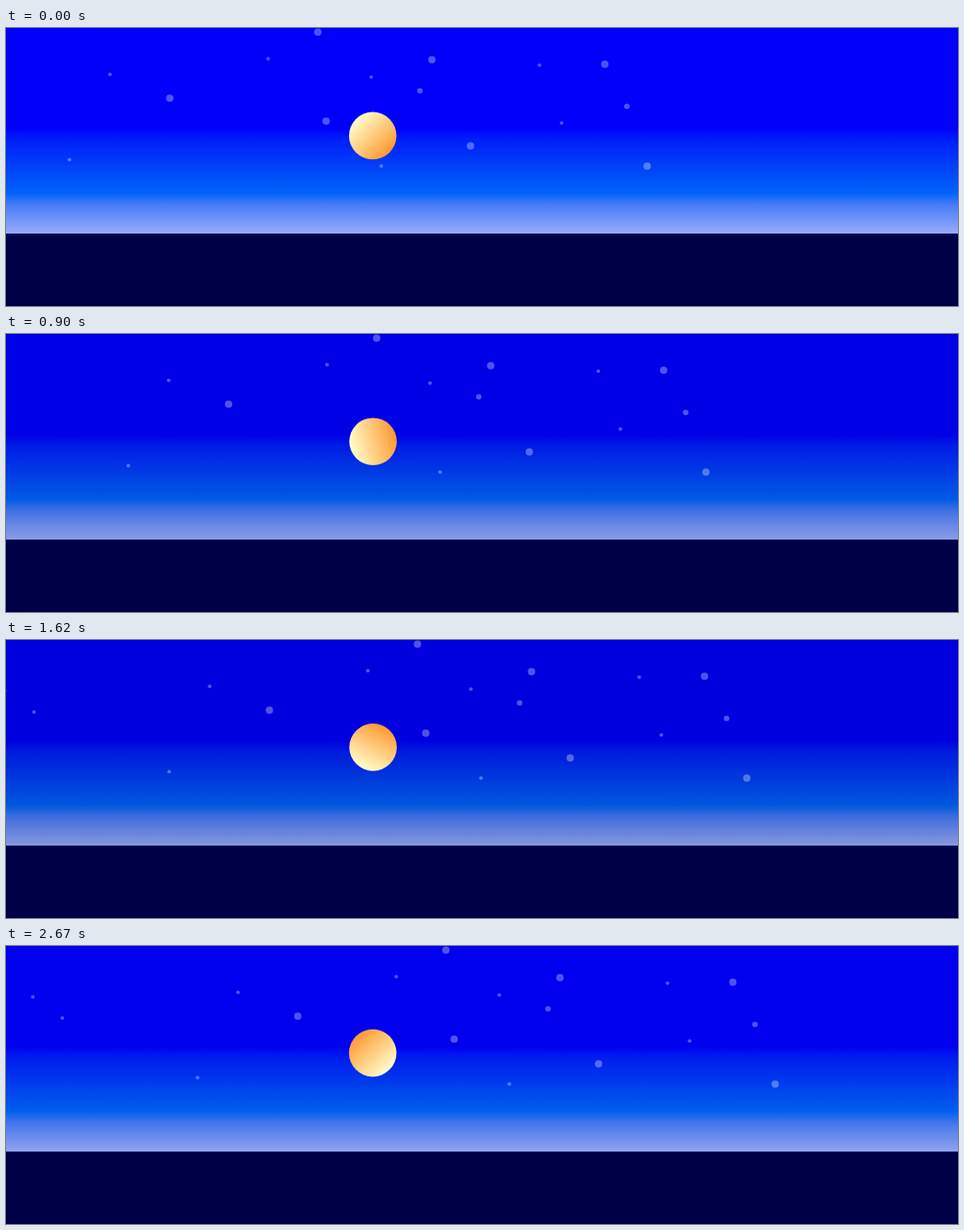
Animation, 1035 px wide and 303 px high, one loop 2.7 s. Source, as an HTML page with a canvas:

```html
<!DOCTYPE html>
<html>
<head>
<meta charset="utf-8">
<title>Night sky</title>
<style>
html, body { margin: 0; width: 100%; height: 100%; overflow: hidden; background: #000046; }
canvas { display: block; }
</style>
</head>
<body>
<canvas id="stage" width="1035" height="303"></canvas>
<script>
const ctx = document.getElementById('stage').getContext('2d');
const LOOP = 2700, STEP = 30, WIDTH = 1035, HORIZON = 224;

// starting points of the stars, grouped by radius
const stars = {
  4: [[178, 76], [339, 4], [348, 101], [463, 34], [505, 128], [651, 39], [697, 150]],
  3: [[450, 68], [675, 85]],
  2: [[-110, 55], [-78, 78], [69, 143], [113, 50], [285, 33], [397, 53], [408, 150], [580, 40], [604, 103]]
};

// The drift slows down twice; the sky dims, then slowly brightens.
const drift = t => 0.0252 * t + 0.0365 * Math.min(t, 1740) + 0.0148 * Math.min(t, 570);
const brightness = t => Math.max(0.985 - t / 11000, 0.777 + t / 16500);

function disc(x, y, r, fill) {
  ctx.fillStyle = fill;
  ctx.beginPath();
  ctx.arc(x, y, r, 0, 2 * Math.PI);
  ctx.fill();
}

function band(y, height, fill) {
  ctx.fillStyle = fill;
  ctx.fillRect(0, y, WIDTH, height);
}

function gradient(x0, y0, x1, y1, stops) {
  const g = ctx.createLinearGradient(x0, y0, x1, y1);
  for (const [at, color] of stops) g.addColorStop(at, color);
  return g;
}

function drawSky(level) {
  const shade = (...rgb) => `rgb(${rgb.map(c => Math.round(c * level))})`;
  band(0, HORIZON, gradient(0, 110, 0, HORIZON, [
    [0, shade(0, 0, 255)],
    [0.1, shade(0, 30, 253)],
    [0.61, shade(0, 99, 252)],
    [0.73, shade(74, 126, 252)],
    [1, shade(155, 174, 254)]
  ]));
  band(HORIZON, 79, '#000046');
  band(HORIZON, 1, '#080e64');
}

function drawStars(shift) {
  for (const r in stars)
    for (const [x, y] of stars[r]) disc(x + shift, y + 0.5, +r, 'rgba(255,255,255,0.32)');
}

// The shading makes half a turn per loop, with a slight wobble of the disc.
function drawMoon(turn) {
  const wobble = Math.PI / 2 - turn, angle = Math.PI / 4 - turn, r = 25.8;
  const x = 398.7 + 0.4 * Math.cos(wobble), y = 117 + 0.4 * Math.sin(wobble);
  const dx = r * Math.cos(angle), dy = r * Math.sin(angle);
  disc(x, y, r, gradient(x - dx, y - dy, x + dx, y + dy, [[0, '#ffffcc'], [1, '#ff9933']]));
}

function draw(now) {
  const t = Math.floor(now % LOOP / STEP) * STEP;
  drawSky(brightness(t));
  drawStars(drift(t));
  drawMoon(Math.PI * t / LOOP);
}

const start = performance.now();
function tick() {
  draw(performance.now() - start);
  requestAnimationFrame(tick);
}
tick();
</script>
</body>
</html>
```
